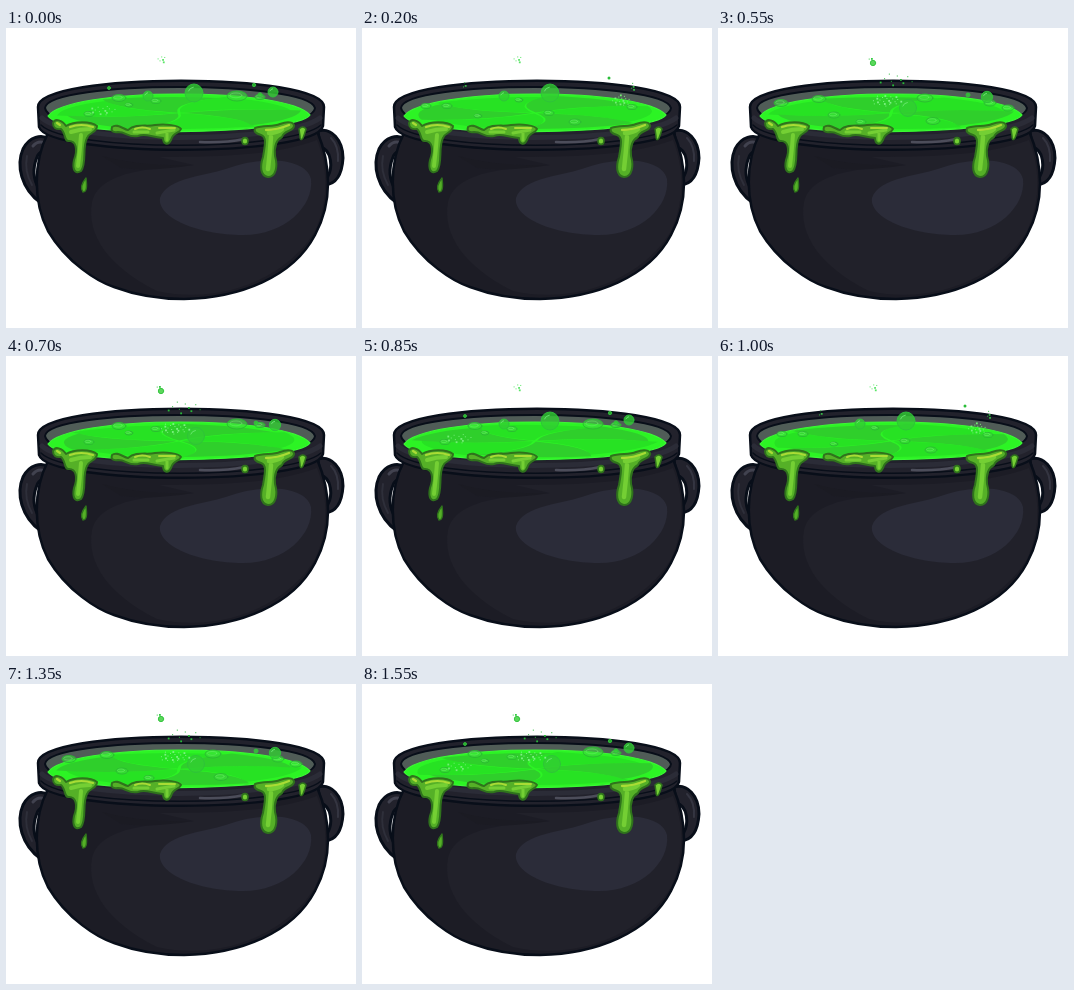
Recreate the animation shown at these times as an HTML page with a canvas. Size 350x300 px, loop 1600 ms.

```html
<!DOCTYPE html>
<html lang="en">
<head>
<meta charset="utf-8">
<title>Bubbling cauldron</title>
<style>
  html, body { margin: 0; width: 100%; height: 100%; overflow: hidden; background: #fff; }
  canvas { display: block; width: 350px; height: 300px; }
</style>
</head>
<body>
<canvas id="stage" width="350" height="300"></canvas>
<script>
const ctx = document.getElementById('stage').getContext('2d');
const LOOP = 1600, STEP = 50, CYCLE = 800;
const INK = '#080e19', IRON = '#22222c', TAU = Math.PI * 2;

function shape(d, fill, stroke, width = 2) {
  const path = new Path2D(d);
  if (fill) { ctx.fillStyle = fill; ctx.fill(path); }
  if (stroke) {
    ctx.strokeStyle = stroke;
    ctx.lineWidth = width;
    ctx.lineCap = ctx.lineJoin = 'round';
    ctx.stroke(path);
  }
}

function oval(x, y, rx, ry, fill, stroke, width = 1) {
  ctx.beginPath();
  ctx.ellipse(x, y, rx, ry, 0, 0, TAU);
  if (fill) { ctx.fillStyle = fill; ctx.fill(); }
  if (stroke) { ctx.strokeStyle = stroke; ctx.lineWidth = width; ctx.stroke(); }
}

function bubble(x, y, r) {
  oval(x, y, r, r, 'rgba(50,205,50,.8)', '#2fc23a', .9);
  if (r > 3) {
    ctx.beginPath();
    ctx.arc(x, y, r * .65, 3.5, 4.6);
    ctx.strokeStyle = '#6be873';
    ctx.stroke();
  }
}

function dome(x, y, r) {
  shape(`M${x - r} ${y + r * .45}C${x - r} ${y - r} ${x + r} ${y - r} ${x + r} ${y + r * .45}Q${x} ${y + r} ${x - r} ${y + r * .45}Z`,
    'rgba(56,220,52,.85)', '#2abf33', .9);
}

function ring(x, y, r) {
  oval(x, y, r, r * .5, 'rgba(60,220,58,.6)', '#2bb932', .9);
  oval(x - 1, y - .6, r * .6, r * .24, null, 'rgba(120,240,115,.6)', .7);
}

function specks(x, y, w, h, count, color) {
  ctx.fillStyle = color;
  for (let i = 0; i < count; i++) {
    const a = i * 2.4, d = Math.sqrt((i + .5) / count);
    const size = i % 3 ? 1 : 1.8;
    ctx.fillRect(x + Math.cos(a) * w * d, y + Math.sin(a) * h * d, size, size);
  }
}

function pot() {
  shape('M46 112C35 105 23 109 17 121C10 137 15 161 35 175L33 161C27 151 27 139 31 129C33 123 39 122 45 125Z', IRON, INK, 3);
  shape('M312 103C325 99 337 112 337 130C336 147 330 156 319 157L322 148C326 141 327 122 314 119Z', IRON, INK, 3);
  shape('M27 118Q32 112 39 115', null, '#41424f', 3);
  shape('M21 128Q18 143 26 157', null, '#2e2f3a', 2);
  shape('M325 110Q333 118 332 133', null, '#343541', 2);

  shape('M42 105C27 134 27 174 42 203C61 235 92 254 108 259C132 268 154 271 178 271C234 270 287 249 309 207C327 174 325 136 311 103Z', '#1c1c25', INK, 2.5);
  shape('M188 137C154 141 95 140 86 174C80 207 103 239 151 263C219 278 283 247 309 203C324 171 321 137 311 112C274 126 225 129 153 129Z', '#21212a');
  shape('M96 128Q138 139 188 137Q144 144 115 140Z', '#1b1b23');
  shape('M154 170C161 149 202 148 226 139C258 128 300 130 305 151C308 178 279 207 237 207C193 207 151 190 154 170Z', '#2b2c39');

  shape('M32 79C32 44 318 44 318 79L317 98C309 130 42 129 33 99Z', IRON, INK, 2.5);
  shape('M36 90C62 116 280 116 314 90', null, '#2b2c37', 5);
  shape('M35 97C62 124 284 124 315 97', null, INK, 1.5);
  shape('M194 114Q219 115 238 111', null, '#4c4d5a', 2.5);
  shape('M39 80C42 52 302 52 309 80C307 109 44 113 39 80Z', '#505c57', INK, 2);
}

const liquid = new Path2D('M42 88C52 74 110 66 173 66C236 66 292 73 304 87C292 107 56 111 42 88Z');

function swirl(turn) {
  ctx.save();
  ctx.clip(liquid);
  ctx.fillStyle = '#2cf424';
  ctx.fillRect(35, 55, 280, 60);
  ctx.translate(173, 85);
  ctx.scale(1, .14);
  ctx.rotate(turn * TAU);
  for (let i = 0; i < 6; i++) {
    ctx.rotate(TAU / 6);
    shape('M3 0Q58 -40 122 -18Q118 48 72 88Q64 30 3 0Z', i % 2 ? 'rgba(48,206,44,.95)' : 'rgba(38,224,36,.85)');
  }
  ctx.restore();
  ctx.strokeStyle = '#3cf935';
  ctx.lineWidth = 1.2;
  ctx.stroke(liquid);
}

const rings = [
  [[83, 86, 5], [113, 70, 7], [123, 77, 4], [150, 73, 5], [231, 68, 10], [254, 69, 5]],
  [[64, 78, 5], [85, 78, 5], [116, 88, 4], [187, 85, 5], [213, 94, 6], [157, 72, 4], [270, 79, 5]],
  [[63, 75, 7], [101, 71, 7], [116, 87, 6], [143, 94, 5], [207, 70, 8], [215, 93, 7], [272, 75, 6], [290, 80, 6]]
];

function surface(t) {
  const set = t < 150 || t >= 600 ? 0 : t < 350 ? 1 : 2;
  rings[set].forEach(r => ring(...r));
}

function centreBubbles(t) {
  if (t < 250) {
    bubble(188, 65, 9);
    bubble(142, 68, 5);
    specks(155, 31, 4, 4, 6, '#5be568');
  } else if (t < 550) {
    dome(167, 73, 11);
    dome(193, 84, 10);
    bubble(184, 57, 8);
    bubble(142, 63, 5);
    bubble(163, 62, 3.7);
    bubble(155, 45, 2.5);
  } else {
    bubble(190, 80, 8.5);
    bubble(155, 35, 2.7);
    specks(168, 72, 15, 6, 23, '#7df283');
    specks(178, 51, 18, 7, 10, '#28b939');
    specks(152, 30, 2, 1, 2, '#31cb42');
  }
}

function sideBubbles(t) {
  if (t < 200 || t >= 750) {
    bubble(267, 64, 5);
    bubble(254, 67, 2.2);
    bubble(248, 57, 1.7);
    bubble(103, 60, 1.5);
    specks(96, 82, 13, 5, 14, '#74ee76');
  } else if (t < 500) {
    oval(247, 50, 1.5, 1.5, '#29bd38');
    specks(259, 72, 9, 6, t < 350 ? 18 : 13, '#74ee76');
    specks(270, 58, 2, 4, 4, '#35b944');
    specks(102, 57, 2, 3, 3, '#35b944');
  } else {
    bubble(269, 69, 5.7);
    bubble(250, 67, 2);
  }
}

function slime() {
  const edge = '#2f731c', green = '#55b027', core = '#74cf34', light = '#a9dc35';
  shape('M47 95C49 90 56 92 60 98C68 93 85 93 91 98C91 105 83 104 81 110C76 119 81 136 75 143C69 147 66 141 68 132C72 121 70 113 63 113C58 114 60 105 55 101Q47 102 47 95Z', green, edge, 2);
  shape('M65 104Q74 101 84 101M75 107Q74 122 72 138', null, core, 4);
  shape('M51 95L54 97M64 99Q75 95 87 99', null, light, 2.2);
  shape('M80 150C81 158 81 164 77 164C74 160 76 155 80 150Z', green, edge, 1.4);
  shape('M106 99C111 95 117 101 122 102C130 95 141 99 149 97C160 96 173 97 175 101C173 106 167 104 165 112C162 118 157 116 157 110C144 109 140 105 132 108C122 110 121 104 112 104Q104 105 106 99Z', green, edge, 2);
  shape('M128 104L142 104M151 105L168 102M161 104L161 112', null, core, 3);
  shape('M129 101Q136 98 144 101M153 100L169 100', null, light, 2);
  shape('M249 100C258 97 267 99 274 96C282 93 288 94 288 98C287 104 278 102 276 109C270 112 268 118 269 128C272 138 270 149 262 149C254 148 254 138 257 129C259 117 261 109 255 107Q247 105 249 100Z', green, edge, 2);
  shape('M263 105Q271 105 276 101M265 109Q264 124 262 141', null, core, 4.5);
  shape('M260 102Q271 102 283 97', null, light, 2.3);
  oval(239, 113, 3, 3.4, core, edge, 1.6);
  shape('M293 101Q297 97 300 101Q299 105 297 110Q294 114 294 108Z', core, edge, 1.5);
}

function draw(now) {
  const time = Math.floor((now % LOOP) / STEP) * STEP;
  const t = time % CYCLE;
  ctx.clearRect(0, 0, 350, 300);
  pot();
  swirl(time / LOOP);
  surface(t);
  sideBubbles(t);
  centreBubbles(t);
  slime();
}

const start = performance.now();
function tick() {
  draw(performance.now() - start);
  requestAnimationFrame(tick);
}
tick();
</script>
</body>
</html>
```
